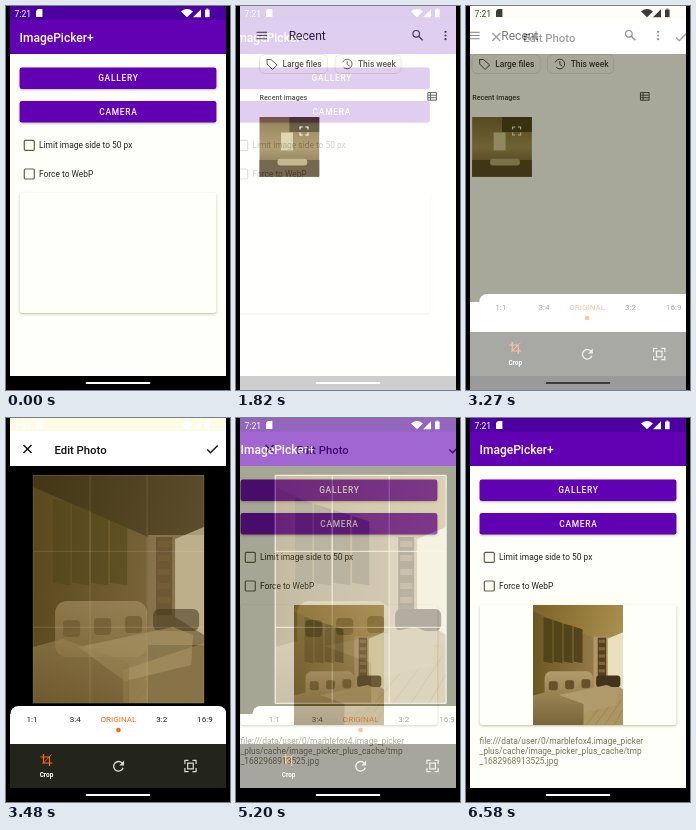
Animation of 224x384 px, one loop 8000 ms. Source, as an HTML page with a canvas:

```html
<!DOCTYPE html>
<html lang="en">
<head>
<meta charset="utf-8">
<title>Image picker demo</title>
<style>
html, body { margin: 0; width: 100%; height: 100%; overflow: hidden; background: #000; }
canvas { display: block; width: 224px; height: 384px; }
</style>
</head>
<body>
<canvas id="stage"></canvas>
<script>
const W = 224, H = 384, LOOP = 8000;
const LEFT = 4, RIGHT = 220, MID = 112, MARGIN = 13.6, INNER = 196.8, NAV = 370;
const OPEN_PICKER = 1674, OPEN_EDIT = 3174, CLOSE_EDIT = 5102;
const TAP_GALLERY = 1140, TAP_THUMB = 2650, TAP_DONE = 4650;
const SHIFT = 21.6;
const PURPLE = '#6200b3', ORANGE = '#f96a12', INK = '#444', PALE = '#dcdcd0', PAPER = '#fffffa';
const dpr = window.devicePixelRatio || 1;

function setup(cv) {
  cv.width = W * dpr;
  cv.height = H * dpr;
  const c = cv.getContext('2d');
  c.scale(dpr, dpr);
  return c;
}
const stage = setup(document.getElementById('stage'));
const buffer = document.createElement('canvas');
const layerCtx = setup(buffer);
let g = stage;

const ramp = (t, a, b) => Math.max(0, Math.min(1, (t - a) / (b - a)));
const slide = t => t <= 0 ? 0 : 1 - Math.exp(-Math.pow(t / 110, 1.3));
const fade = t => ramp(t, 50, 170);

function rect(x, y, w, h, color) {
  g.fillStyle = color;
  g.fillRect(x, y, w, h);
}
// Full-width band, wide enough to stay closed while a screen slides.
const band = (y, h, color) => rect(-30, y, W + 60, h, color);

function round(x, y, w, h, r, color) {
  g.beginPath();
  g.roundRect(x, y, w, h, r);
  g.fillStyle = color;
  g.fill();
}
function box(x, y, w, h, color, width = 1, r = 0) {
  g.beginPath();
  g.roundRect(x, y, w, h, r);
  g.strokeStyle = color;
  g.lineWidth = width;
  g.stroke();
}
function card(x, y, w, h, color) {
  g.save();
  g.shadowColor = 'rgba(60,60,0,.35)';
  g.shadowBlur = 2.5 * dpr;
  g.shadowOffsetY = dpr;
  round(x, y, w, h, 2.4, color);
  g.restore();
}
function clipped(x, y, w, h, draw) {
  g.save();
  g.beginPath();
  g.rect(x, y, w, h);
  g.clip();
  draw();
  g.restore();
}
function circle(x, y, r, color) {
  g.beginPath();
  g.arc(x, y, r, 0, 7);
  g.fillStyle = color;
  g.fill();
}
function arc(x, y, r, color, width = 1, from = 0, to = 7) {
  g.beginPath();
  g.arc(x, y, r, from, to);
  g.strokeStyle = color;
  g.lineWidth = width;
  g.stroke();
}
function trace(p) {
  g.beginPath();
  for (let i = 0; i < p.length; i += 2) g.lineTo(p[i], p[i + 1]);
}
function poly(color, ...p) {
  trace(p);
  g.fillStyle = color;
  g.fill();
}
function line(color, width, ...p) {
  trace(p);
  g.strokeStyle = color;
  g.lineWidth = width;
  g.stroke();
}
function text(s, x, y, size, color, weight = 400, align = 'left', spacing = 0) {
  g.font = `${weight} ${size}px Roboto, sans-serif`;
  g.letterSpacing = spacing + 'px';
  g.textAlign = align;
  g.fillStyle = color;
  g.fillText(s, x, y);
}
function blend(x0, y0, x1, y1, ...colors) {
  const k = g.createLinearGradient(x0, y0, x1, y1);
  colors.forEach((c, i) => k.addColorStop(i / (colors.length - 1), c));
  return k;
}
// Press highlight: grows, then fades.
function ripple(t, x, y, r0, r1, rgb, strength) {
  if (t < 0 || t > 450) return;
  const a = strength * (1 - ramp(t, 220, 450));
  circle(x, y, r0 + (r1 - r0) * ramp(t, 0, 250), `rgba(${rgb},${a})`);
}

// Living room in a few flat shapes, on a 3 x 4 field of 57 px cells.
function photo(x, y, w) {
  const h = w * 4 / 3;
  clipped(x, y, w, h, () => {
    g.translate(x, y);
    g.scale(w / 171, w / 171);
    rect(0, 0, 171, 228, blend(0, 0, 171, 50, '#7c6426', '#a98f50'));
    poly(blend(0, 0, 115, 0, '#6c5722', '#937a48'), 0, 12, 115, 62, 115, 228, 0, 228);
    rect(115, 60, 56, 110, '#b0976a');
    for (let i = 0; i < 4; i++) {
      const l = 20 + i * 19, t = 23 + i * 6;
      poly('#514519', l, t, l + 17, t + 5, l + 17, 110, l, 108);
    }
    rect(123, 62, 16, 78, '#55411f');
    for (let i = 0; i < 5; i++) rect(125, 66 + i * 14, 12, 6, '#7d6439');
    poly('#e9e1bd', 142, 64, 171, 52, 171, 160, 142, 142);
    poly('#ab9560', 90, 195, 171, 168, 171, 228, 90, 228);
    for (let i = 0; i < 5; i++) line('#8b7443', 0.8, 100 + i * 18, 228, 140 + i * 14, 180);
    round(120, 134, 46, 22, 6, '#41341b');
    round(22, 126, 92, 56, 12, blend(0, 126, 0, 182, '#b29b6c', '#927c4c'));
    for (let i = 0; i < 3; i++) round(30 + i * 31, 145 - i * 2, 17, 17, 4, '#66512b');
    poly('#b09b6c', 45, 172, 140, 152, 160, 160, 158, 190, 92, 206);
    poly(blend(0, 165, 0, 228, '#9c8555', '#79653a'), 0, 172, 30, 164, 96, 188, 96, 228, 0, 228);
  });
}

function thumb(x, y, s) {
  rect(x, y, s, s, blend(x, y, x, y + s, '#7a6634', '#a18c58', '#5d4c25'));
  rect(x + s / 2, y, s / 2, s / 4, '#463c1b');
  rect(x + s * 0.36, y + s * 0.26, s / 5, s * 0.3, '#d9cda0');
  rect(x, y + s * 0.72, s, s * 0.28, '#554526');
  round(x + s * 0.3, y + s * 0.7, s / 2, s / 9, 3, '#b7a678');
}

// Four corner marks around a point.
function corners(x, y, r, color, width) {
  for (let i = 0; i < 4; i++) {
    const a = i % 2 ? r : -r, b = i < 2 ? r : -r;
    line(color, width, x + a, y + b * 0.35, x + a, y + b, x + a * 0.35, y + b);
  }
}

function button(label, y, t) {
  card(MARGIN, y, INNER, 21.6, PURPLE);
  clipped(MARGIN, y, INNER, 21.6, () => ripple(t, MID, y + 11, 10, 105, '255,255,255', 0.25));
  text(label, MID + 0.4, y + 13.8, 8.4, '#fff', 500, 'center', 0.75);
}

function checkbox(label, y) {
  box(18.3, y - 5, 10, 10, '#62604a', 1.2, 1);
  text(label, 33, y + 3.1, 8.4, '#222');
}

function home(t) {
  band(0, H, PAPER);
  band(0, 14, '#4c00a0');
  band(14, 34, PURPLE);
  text('ImagePicker+', MARGIN, 35.7, 12, '#fff', 500);
  button('GALLERY', 61.5, t - TAP_GALLERY);
  button('CAMERA', 95, -1);
  checkbox('Limit image side to 50 px', 139.3);
  checkbox('Force to WebP', 168);
  card(MARGIN, 187, INNER, 120, PAPER);
  if (t > OPEN_EDIT) {
    photo(67, 187, 90);
    const path = ['file:///data/user/0/marblefox4.image_picker', '_plus/cache/image_picker_plus_cache/tmp', '_1682968913525.jpg'];
    path.forEach((s, i) => text(s, MARGIN, 326 + i * 10, 8.4, '#75755a'));
  }
  band(NAV, 14, '#000');
}

function chip(x, w, label) {
  box(x, 48.5, w, 19, '#dcdccc', 0.7, 5);
  text(label, x + 23, 61, 8.4, '#333', 500);
}

function picker(t) {
  const x = 18.5, size = 59.7;
  band(0, H, '#fff');
  for (let i = -1; i < 2; i++) {
    line(INK, 1.1, 15.5, 29.5 + i * 3.2, 26, 29.5 + i * 3.2);
    circle(204.5, 29.5 + i * 3.7, 1.1, INK);
  }
  text('Recent', 47.7, 34, 12, '#222');
  arc(175.2, 27.8, 3.3, INK, 1.2);
  line(INK, 1.3, 177.6, 30.2, 181.6, 34.2);

  chip(x, 68, 'Large files');
  chip(94, 66, 'This week');
  line(INK, 1, 26, 53.5, 30, 53.5, 36, 59, 31.5, 63.5, 26, 58, 26, 53);
  arc(106.2, 58, 4.8, INK, 1, -2.8, 2.4);
  line(INK, 1, 106.2, 55, 106.2, 58.4, 108.6, 60);

  text('Recent images', x, 93.6, 7.2, '#333', 500);
  box(186.8, 86.6, 8.6, 7.6, INK);
  for (const y of [89.2, 91.7]) line(INK, 1, 187, y, 195, y);
  line(INK, 1, 189.5, 87, 189.5, 94);

  thumb(x, 111, size);
  corners(63, 125, 4, '#fff', 1.1);
  clipped(x, 111, size, size, () => ripple(t - TAP_THUMB, 48, 141, 6, 44, '0,0,0', 0.15));
}

function cropGrid(x, y, cell) {
  box(x, y, cell * 3, cell * 4, '#fff9e4');
  for (const k of [1, 2]) {
    const cx = x + k * cell, cy = y + k * cell * 4 / 3;
    line('#f2ecd0', 0.9, cx, y, cx, y + cell * 4);
    line('#f2ecd0', 0.9, x, cy, x + cell * 3, cy);
  }
}

function edit(t, alpha) {
  // Half-faded black reads as olive.
  const c = Math.round(140 * alpha * (1 - alpha));
  band(0, H, `rgb(${c},${c},0)`);
  band(0, 48, '#fff');
  band(0, 13, '#fffce6');
  line('#111', 1.4, 17, 27, 25, 35);
  line('#111', 1.4, 25, 27, 17, 35);
  text('Edit Photo', 48, 35.7, 11.3, '#111', 500);
  ripple(t - TAP_DONE, 203, 31.5, 9, 15, '150,140,40', 0.07);
  line('#111', 1.4, 200.8, 31.5, 204, 34.8, 211.2, 27.4);

  g.globalAlpha = ramp(t, 3340, 3600);
  photo(26.6, 57, 171);
  g.globalAlpha = ramp(t, 3440, 3700);
  cropGrid(26.6, 57.3, 57);
  g.globalAlpha = 1;

  round(LEFT, 288, RIGHT - LEFT, 16, [8, 8, 0, 0], '#fff');
  band(296, 30, '#fff');
  ['1:1', '3:4', 'ORIGINAL', '3:2', '16:9'].forEach((s, i) =>
    text(s, MID + (i - 2) * 43.2, 304, 8.1, i === 2 ? ORANGE : '#222', 400, 'center'));
  circle(MID, 312, 2.3, ORANGE);

  band(326, 44, '#23241a');
  line(ORANGE, 1.2, 37, 336, 37, 345, 46, 345);
  line(ORANGE, 1.2, 34, 339, 43, 339, 43, 348);
  line(ORANGE, 0.9, 36, 346, 45, 336.5);
  text('Crop', 40, 359, 6.4, '#fff', 700, 'center');
  arc(MID, 348.3, 4.8, PALE, 1.3, 0.3, 5.6);
  poly(PALE, 117.6, 342.5, 117.6, 347.5, 112.8, 347.5);
  corners(184, 348, 5.6, PALE, 1.2);
  box(181.2, 345.2, 5.6, 5.6, PALE, 1.2);
  band(NAV, 14, '#000');
}

function systemBars(t) {
  const dark = ramp(t, OPEN_PICKER + 150, OPEN_PICKER + 350) - ramp(t, OPEN_EDIT + 100, OPEN_EDIT + 250);
  const v = Math.round(255 - 195 * dark), ink = `rgb(${v},${v},${v})`;
  text('7:21', 8.6, 10.6, 8.6, ink);
  poly(ink, 32, 3, 36.4, 3, 36.4, 11, 30, 11, 30, 5);
  g.beginPath();
  g.moveTo(181, 11.2);
  g.arc(181, 11.2, 8.2, -Math.PI * 0.76, -Math.PI * 0.24);
  g.fillStyle = ink;
  g.fill();
  poly(ink, 187, 11.2, 195, 11.2, 195, 3.2);
  rect(199, 3.6, 4.6, 7.6, ink);
  rect(200.3, 2.6, 2, 1, ink);
  round(79.7, 375.9, 64.6, 2, 1, ink);
  rect(0, 0, LEFT, H, '#000');
  rect(RIGHT, 0, LEFT, H, '#000');
}

function layer(draw, t, dx, alpha) {
  if (alpha <= 0) return;
  g = layerCtx;
  g.clearRect(0, 0, W, H);
  g.save();
  g.translate(dx, 0);
  draw(t, alpha);
  g.restore();
  g = stage;
  g.globalAlpha = alpha;
  g.drawImage(buffer, 0, 0, W, H);
  g.globalAlpha = 1;
}

function open(from, to, t, since) {
  const p = slide(t - since);
  layer(from, t, -SHIFT * p, 1);
  layer(to, t, SHIFT * (1 - p), fade(t - since));
}

function close(from, to, t, since) {
  const p = slide(t - since);
  layer(to, t, -SHIFT * (1 - p), 1);
  layer(from, t, SHIFT * p, 1 - ramp(t - since, 30, 145));
}

function render(t) {
  if (t < OPEN_EDIT) open(home, picker, t, OPEN_PICKER);
  else if (t < CLOSE_EDIT) open(picker, edit, t, OPEN_EDIT);
  else close(edit, home, t, CLOSE_EDIT);
  systemBars(t);
}

const start = performance.now();
function tick() {
  render((performance.now() - start) % LOOP);
  requestAnimationFrame(tick);
}
tick();
</script>
</body>
</html>
```
